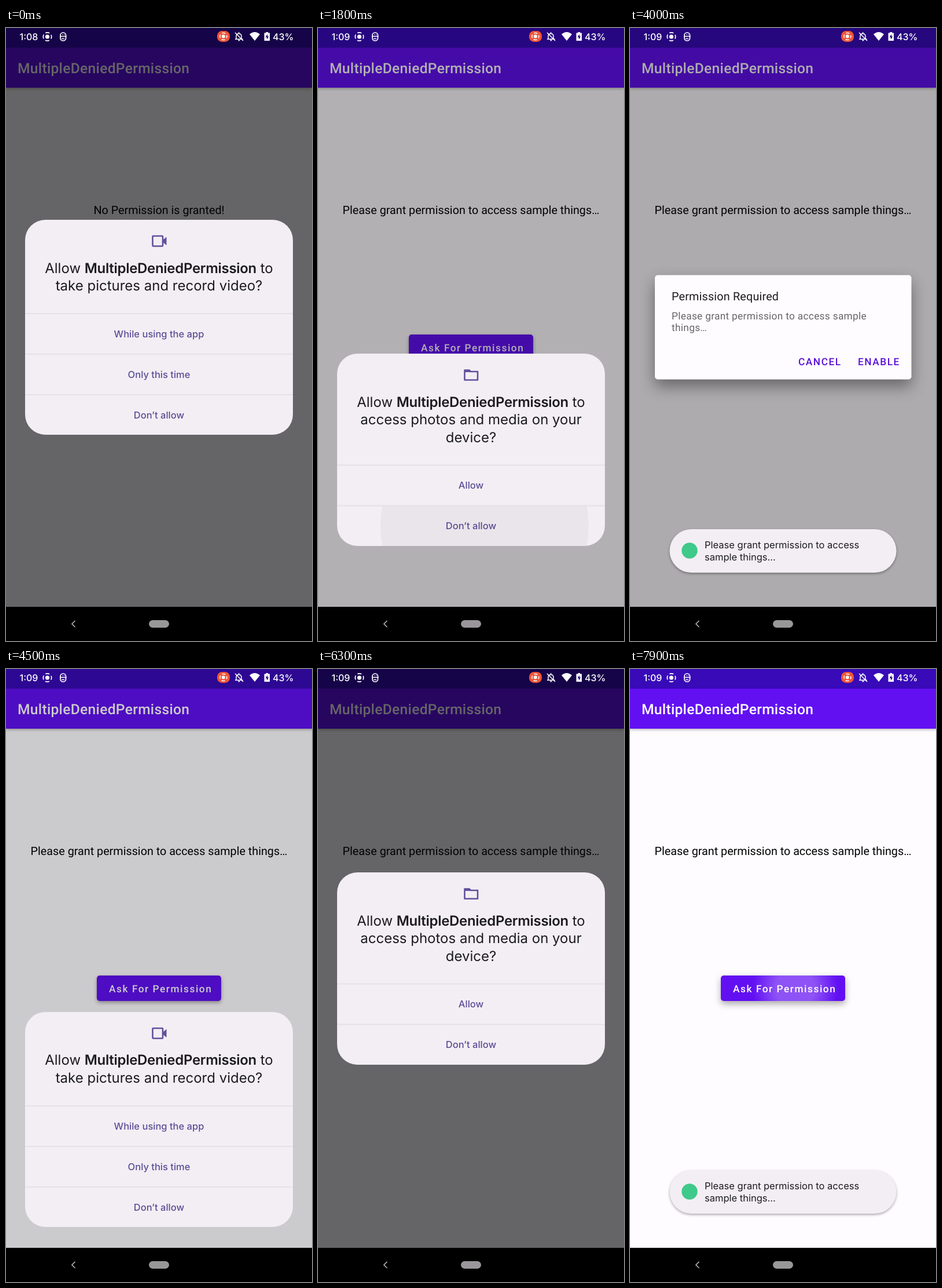
An HTML page for the animation above (8000 ms loop, 529 by 1058 pixels).

```html
<!DOCTYPE html>
<html lang="en">
<head>
<meta charset="utf-8">
<title>Permission flow</title>
<style>
  html, body { margin: 0; width: 100%; height: 100%; overflow: hidden; background: #000; }
  svg { display: block; width: 100vw; height: 100vh; text-rendering: geometricPrecision; }
  text { font-family: Roboto, sans-serif; }
  .sans text { font-family: Inter, sans-serif; }
  .mid { text-anchor: middle; }
  .caps { font-size: 17.28px; font-weight: 500; letter-spacing: 1.54px; }
  .head { font-size: 24px; fill: #1b1a20; }
  .head tspan { font-weight: 600; letter-spacing: -.3px; }
  .row { font-size: 16.5px; font-weight: 500; fill: #5a4e96; }
  .rule { stroke: #e6e1e9; stroke-width: 2; }
  .icon { fill: none; stroke: #5f529b; stroke-width: 2.6; stroke-linejoin: round; }
  #bar { filter: drop-shadow(0 2px 2px #0004); }
  #alert { filter: drop-shadow(0 12px 13px #0006); }
  #toast { filter: drop-shadow(0 2px 2px #0005); }
</style>
</head>
<body>
<svg viewBox="0 0 529 1058" preserveAspectRatio="none">
  <defs>
    <radialGradient id="glow">
      <stop offset=".45" stop-color="#fff"/>
      <stop offset="1" stop-color="#fff" stop-opacity="0"/>
    </radialGradient>
    <clipPath id="buttonClip"><rect x="157" y="529" width="215" height="44" rx="5"/></clipPath>
    <clipPath id="enableClip"><rect x="385" y="553" width="92" height="44" rx="5"/></clipPath>
    <clipPath id="rowClip"><path d="M33 0H496V35A35 35 0 0 1 461 70H68A35 35 0 0 1 33 35Z"/></clipPath>
  </defs>

  <rect width="529" height="999" fill="#fefcff"/>
  <rect id="bar" y="34" width="529" height="69" fill="#6210f2"/>
  <rect width="529" height="34" fill="#380ab8"/>
  <text x="20" y="78" font-size="24.6" font-weight="500" letter-spacing=".3" fill="#fff">MultipleDeniedPermission</text>
  <text id="label" class="mid" x="264.5" y="320.5" font-size="19.75"></text>
  <rect id="button" x="157" y="529" width="215" height="44" rx="5" fill="#6210f2"/>
  <g clip-path="url(#buttonClip)"><circle id="buttonRipple" cy="551" fill="url(#glow)"/></g>
  <text class="caps" x="178" y="557.5" fill="#fff">Ask For Permission</text>

  <rect id="dim" width="529" height="999"/>

  <g id="alert">
    <rect x="43" y="426.5" width="443.5" height="180" rx="5" fill="#fefcff"/>
    <text x="72" y="469.5" font-size="19.75" letter-spacing=".19" fill="#1c1b1f">Permission Required</text>
    <g font-size="17.28" letter-spacing=".31" fill="#666568">
      <text x="72" y="502.5">Please grant permission to access sample</text>
      <text x="72" y="522.5">things…</text>
    </g>
    <g clip-path="url(#enableClip)"><circle id="enableRipple" cx="431" cy="575" fill="#6210f2"/></g>
    <g fill="#5a10d8">
      <text class="caps" x="291" y="581.5">CANCEL</text>
      <text class="caps" x="394" y="581.5">ENABLE</text>
    </g>
  </g>

  <g id="perm" class="sans">
    <rect id="panel" x="33" width="463" rx="35" fill="#f3eef4"/>
    <g clip-path="url(#rowClip)" id="lastRow"><circle id="rowRipple" cx="288" cy="35"/></g>
    <text class="head mid" x="264.5" y="91.5">Allow <tspan>MultipleDeniedPermission</tspan> to</text>
    <g id="camera">
      <rect class="icon" x="253.5" y="28" width="17.5" height="17.5" rx="1"/>
      <path d="M271 35l6.5-5.5v14.5l-6.5-5.5z" fill="#5f529b"/>
      <text class="head mid" x="264.5" y="122">take pictures and record video?</text>
      <path class="rule" d="M33 162H496M33 232H496M33 302H496"/>
      <text class="row mid" x="264.5" y="203">While using the app</text>
      <text class="row mid" x="264.5" y="273">Only this time</text>
      <text class="row mid" x="264.5" y="343">Don’t allow</text>
    </g>
    <g id="media">
      <path class="icon" d="M253.5 45.5V28.5H261.5L264 31H276V45.5Z"/>
      <path d="M253 28h9l2.5 4h-11.5z" fill="#5f529b"/>
      <text class="head mid" x="264.5" y="122">access photos and media on your</text>
      <text class="head mid" x="264.5" y="152.5">device?</text>
      <path class="rule" d="M33 192.5H496M33 262.5H496"/>
      <text class="row mid" x="264.5" y="233">Allow</text>
      <text class="row mid" x="264.5" y="303">Don’t allow</text>
    </g>
  </g>

  <g id="toast" class="sans">
    <rect x="68.5" y="865" width="392" height="75" rx="37.5" fill="#f3eef4"/>
    <circle cx="103" cy="902" r="13.7" fill="#3fc98a"/>
    <g font-size="16.5" fill="#1c1b1f">
      <text x="129" y="897.5">Please grant permission to access</text>
      <text x="129" y="919">sample things…</text>
    </g>
  </g>

  <g class="sans" fill="#fff" font-size="16" font-weight="500">
    <text id="clock" x="23.5" y="20.5"></text>
    <text x="461" y="20.5">43%</text>
  </g>
  <g fill="none" stroke="#fff" stroke-width="1.7">
    <circle cx="71.5" cy="15" r="7.2" stroke-dasharray="7.3 4" stroke-dashoffset="3.6"/>
    <rect x="94" y="8" width="9.5" height="14" rx="4.5"/>
    <path d="M93 14.5H104.5M97 11.5h1M100 11.5h1M96 18.5h5"/>
    <rect x="365" y="5" width="22" height="19" rx="8.5" fill="#ee5538" stroke="none"/>
    <circle cx="375.8" cy="14.6" r="6" stroke-width="1.5" stroke-dasharray="6 3.4" stroke-dashoffset="3"/>
    <path d="M398 19V13.5A4.6 4.6 0 0 1 407 13.5V19M396 19.3H409.5M402.6 7v2M396 8L410 22" stroke-width="1.5"/>
  </g>
  <g fill="#fff">
    <circle cx="71.5" cy="15" r="3.6"/>
    <circle cx="375.8" cy="14.6" r="3"/>
    <path d="M400.8 20.5h4a2 2 0 0 1-4 0zM430 22L421 10.8Q430 3.2 439 10.8Z"/>
    <path d="M449.5 7h3.5v1.5h3v13.5h-9.5V8.500h3z"/>
  </g>
  <path d="M452 10.500l-3.300 5.500h2.200v4l3.300-5.500h-2.200z" fill="#210068"/>

  <rect y="999" width="529" height="59"/>
  <path d="M119.500 1023L114 1028.500L119.500 1034" fill="none" stroke="#b0b0b0" stroke-width="1.700"/>
  <rect x="247" y="1022" width="35" height="13" rx="6.500" fill="#999799"/>
</svg>
<script>
const $ = id => document.getElementById(id);
const set = (id, attrs) => { for (const k in attrs) $(id).setAttribute(k, attrs[k]); };
const ramp = (t, start, len) => Math.min(1, Math.max(0, (t - start) / len));
const show = (id, alpha) => set(id, { opacity: alpha, display: alpha > 0 ? 'inline' : 'none' });
const within = (t, a, b) => t >= a && t < b;

// Grows from the touch, then fades.
function ripple(id, t, start, from, to, alpha, grow = 250) {
  const p = ramp(t, start, grow);
  set(id, {
    r: from + (to - from) * p,
    opacity: t < start ? 0 : alpha * (1 - ramp(t, start + grow, 250))
  });
  return p;
}

function permission(t) {
  const first = t < 3500;
  const enter = first ? 1 : ramp(t, 4400, 400);
  const exit = ramp(t, first ? 1600 : 6650, 400);
  const media = t >= (first ? 600 : 5900);
  const height = media ? 332 : 371;
  const y = (media ? 351 : 331) + 700 * (1 - enter) ** 3.43 + 844 * exit ** 2;
  const open = (first || t >= 4400) && exit < 1;

  show('perm', open ? 1 : 0);
  show('media', media ? 1 : 0);
  show('camera', media ? 0 : 1);
  set('perm', { transform: `translate(0 ${y})` });
  set('panel', { height });
  set('lastRow', { transform: `translate(0 ${height - 70})` });
  const press = media ? (first ? 1400 : 6450) : (first ? 250 : 5550);
  ripple('rowRipple', t, press, 40, 180, .05, 350);
  return open ? .6 * Math.min(1, enter / .75) * (1 - exit) : 0;
}

function draw(t) {
  const permDim = permission(t);
  const alert = ramp(t, 2975, 220) * (1 - ramp(t, 4350, 150));
  show('alert', Math.min(1, alert * 1.6));
  set('dim', { opacity: Math.max(permDim, .32 * alert) });
  ripple('enableRipple', t, 4150, 15, 55, .14);

  const press = t < 5000 ? 2800 : 7800;
  const p = ripple('buttonRipple', t, press, 30, 140, .28);
  set('buttonRipple', { cx: 300 - 36 * p });
  const raised = within(t, press, press + 150);
  $('button').style.filter = `drop-shadow(0 ${raised ? '5px 6px' : '3px 3px'} #0005)`;

  const rise = t < 5000 ? ramp(t, 2050, 200) : ramp(t, 7000, 200);
  show('toast', rise * (t < 5000 ? 1 - ramp(t, 4200, 200) : 1));
  set('toast', { transform: `translate(0 ${30 * (1 - rise) ** 2})` });

  $('clock').textContent = t < 500 ? '1:08' : '1:09';
  $('label').textContent = t < 1600
    ? 'No Permission is granted!'
    : 'Please grant permission to access sample things…';
}

const begin = performance.now();
function tick() {
  draw(Math.floor((performance.now() - begin) % 8000 / 100) * 100);
  requestAnimationFrame(tick);
}
tick();
</script>
</body>
</html>
```
